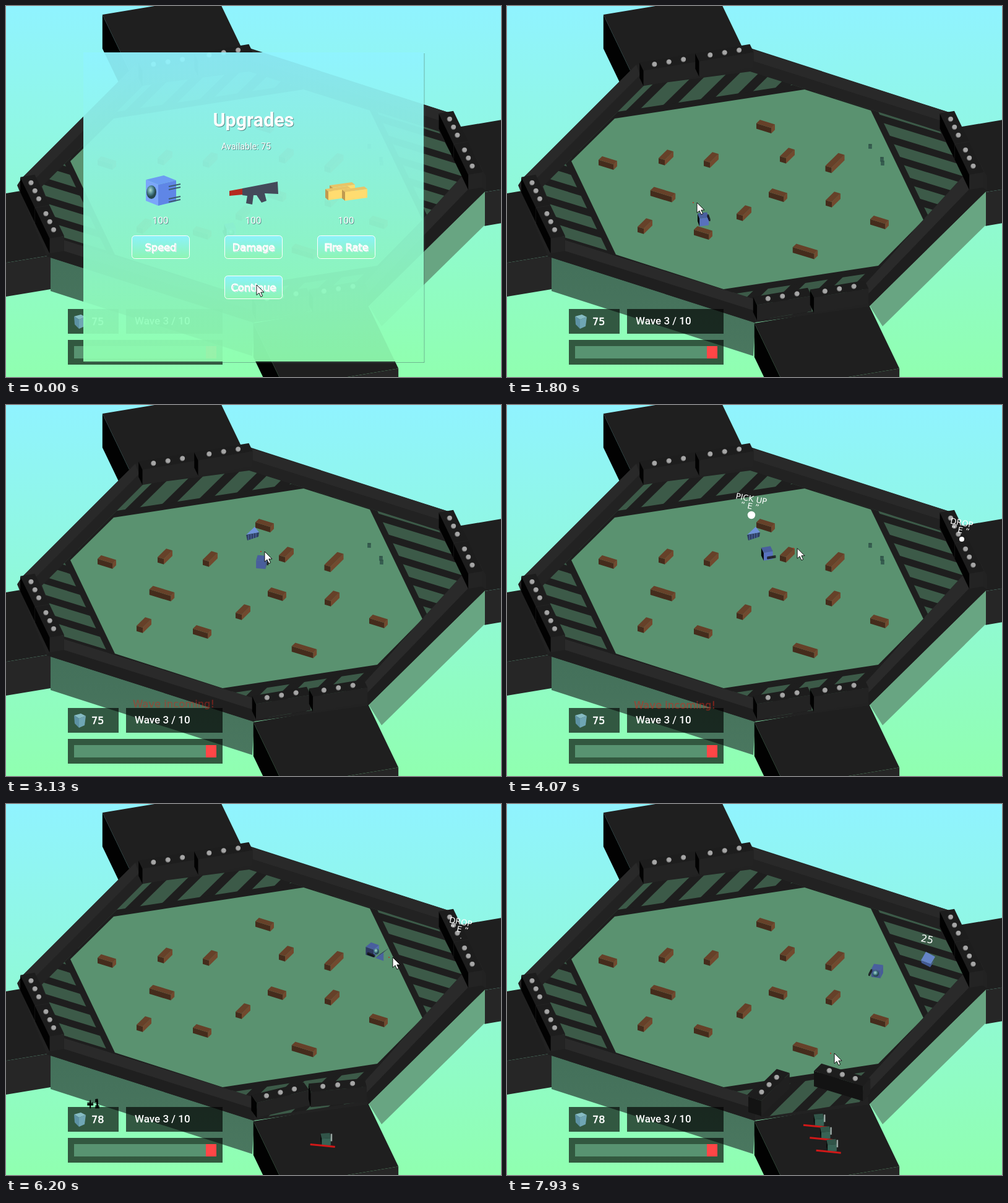
Write an HTML page that moves like this. It is 800 px wide and 600 px high and loops after 8 s.

```html
<!DOCTYPE html>
<html lang="en">
<head>
<meta charset="utf-8">
<title>Arena</title>
<style>
html, body { margin: 0; width: 100%; height: 100%; overflow: hidden; }
svg { display: block; width: 100vw; height: 100vh; }
.wide { font-family: "DejaVu Sans", sans-serif; }
.slim { font-family: Roboto, sans-serif; }
</style>
</head>
<body>
<svg viewBox="0 0 800 600" preserveAspectRatio="none">
  <defs>
    <linearGradient id="sky" x2="0" y2="1"><stop stop-color="#90f3ff"/><stop offset="1" stop-color="#90ffb0"/></linearGradient>
    <linearGradient id="btn" x2="0" y2="1"><stop stop-color="#8cf2fb"/><stop offset="1" stop-color="#8ef5b2"/></linearGradient>
    <linearGradient id="skirt" x2="0" y2="1"><stop stop-color="#43705a"/><stop offset="1" stop-color="#4a775f"/></linearGradient>
    <radialGradient id="glow"><stop stop-color="#d8ffe4"/><stop offset=".2" stop-color="#9be5b4" stop-opacity=".8"/><stop offset="1" stop-color="#78c090" stop-opacity="0"/></radialGradient>
    <radialGradient id="lens" cx=".4" cy=".35"><stop stop-color="#b0dcd0"/><stop offset=".6" stop-color="#4d8590"/><stop offset="1" stop-color="#27494f"/></radialGradient>
    <clipPath id="pit"><path d="M58 292L222 128 393 106 700 203 738 274 580 448 570 482 410 507 400 474 92 378Z"/></clipPath>
  </defs>
  <rect width="800" height="600" fill="url(#sky)"/>
  <g id="arena"></g>
  <g id="actors"></g>
  <g id="hud"></g>
  <g id="menu"></g>
  <g id="pointer"></g>
</svg>
<script>
const $ = id => document.getElementById(id);
const poly = (pts, fill, extra = '') => `<path d="M${pts}Z" fill="${fill}" ${extra}/>`;
const rect = (x, y, w, h, fill, extra = '') =>
  `<rect x="${x}" y="${y}" width="${w}" height="${h}" fill="${fill}" ${extra}/>`;
const dot = (x, y, r, fill) => `<circle cx="${x}" cy="${y}" r="${r}" fill="${fill}"/>`;
const text = (s, x, y, size, cls, extra = '') =>
  `<text x="${x}" y="${y}" font-size="${size}" class="${cls}" fill="#fff" ${extra}>${s}</text>`;
const times = (n, make) => Array.from({ length: n }, (_, i) => make(i)).join('');
const mid = 'text-anchor="middle"';
const clamp = v => Math.min(1, Math.max(0, v));
const lerp = (a, b, k) => a.map((v, i) => v + (b[i] - v) * k);
const shade = (rgb, k) => `rgb(${rgb.map(c => Math.round(c * k))})`;

const WOOD = [150, 96, 60], BLUE = [108, 140, 232], TEAL = [72, 125, 108],
  STEEL = [42, 46, 54], IRON = [42, 42, 42], DECK = [46, 46, 46];
const TURN = Math.PI / 4;

// Ground axes and height to screen offset
const proj = (x, y, z = 0) => [.9 * x + .24 * y, -.15 * x + .5 * y - .77 * z];
const heading = (dx, dy) => Math.atan2(.15 * dx + .9 * dy, .5 * dx - .24 * dy);

// A frame of reference at a screen point, turned by a ground angle
function local(cx, cy, ang) {
  const c = Math.cos(ang), s = Math.sin(ang);
  return (f, r, z) => {
    const p = proj(f * c - r * s, f * s + r * c, z);
    return [cx + p[0], cy + p[1]];
  };
}

// Shaded box around its middle point
function box(cx, cy, len, wid, hgt, ang, rgb) {
  const at = local(cx, cy, ang), h = hgt / 2;
  const corner = [[1, -1], [1, 1], [-1, 1], [-1, -1]].map(([i, j]) => [i * len / 2, j * wid / 2]);
  const sides = times(4, i => {
    const a = corner[i], b = corner[(i + 1) % 4], n = ang + i * Math.PI / 2;
    const nx = Math.cos(n), ny = Math.sin(n);
    if (.5 * ny - .15 * nx < .001) return '';
    const light = .05 + .85 * Math.max(0, .25 * nx + .85 * ny + .06);
    return poly([at(...a, h), at(...b, h), at(...b, -h), at(...a, -h)].join(' '), shade(rgb, light));
  });
  return sides + poly(corner.map(p => at(...p, h)).join(' '), shade(rgb, .68));
}

// Half of a gate; (x, y) is the middle of its upper face
function gate(x, y, ang) {
  const at = local(x, y, ang);
  return box(x, y + 12.5, 98, 26, 32, ang, IRON) + times(3, i => {
    const [px, py] = at(26 * (i - 1), 0, 0);
    return dot(px, py, 4.2, '#6c6c6c') + dot(px + .5, py - .5, 3.6, '#a6a6a6');
  });
}
const gatePair = (x, y, ang) => [-50, 50].map(f => gate(...local(x, y, ang)(f, 0, 0), ang)).join('');

// Hazard bars from (x, y) on, repeated by (dx, dy), running along a ground angle
function bars(n, x, y, dx, dy, ang) {
  return times(n, i => {
    const at = local(x + i * dx, y + i * dy, ang), a = at(-150, 0, 0), b = at(150, 0, 0);
    const next = ([px, py]) => [px + .6 * dx, py + .6 * dy];
    return poly([a, b, next(b), next(a)].join(' '), '#3c5a48');
  });
}

// Wall top from an outer edge a-b to an inner edge c-d, in two tones
function wall(a, b, c, d, outer, inner) {
  const p = lerp(a, c, .5), q = lerp(b, d, .5);
  return poly([a, b, q, p].join(' '), outer) + poly([p, q, d, c].join(' '), inner);
}

function drawArena() {
  const ramp = (x, y) => box(x, y + 27, 205, 208, 71, 0, DECK);
  const floor = '174 182 481 135 588 169 673 346 600 420 350 458 176 402 104 251';
  $('arena').innerHTML =
    ramp(273, 51) + ramp(841, 234) + ramp(-45, 367) +
    poly('72 400 402 504 398 566 72 461', 'url(#skirt)') +
    poly('774 290 774 354 607 518 583 480', '#68a582') +
    ramp(517, 550) +
    poly('18 290 25 279 209 95 390 67 724 175 776 276 776 298 585 486 400 512 66 405', '#222') +
    wall([25, 279], [209, 95], [58, 292], [222, 128], '#292929', '#222') +
    wall([392, 69], [724, 175], [393, 106], [700, 203], '#292929', '#222') +
    wall([66, 405], [400, 512], [92, 378], [402, 474], '#1f1f1f', '#2a2a2a') +
    wall([776, 298], [585, 486], [738, 274], [580, 448], '#1e1e1e', '#2a2a2a') +
    '<g clip-path="url(#pit)">' + rect(0, 80, 800, 440, '#1e1e1e') +
    bars(7, 166, 165, 51, 0, -TURN) + bars(6, 368, 460, 51, 0, -TURN) +
    bars(8, 650, 173, 0, 29, TURN) + bars(7, 100, 243, 0, 29, TURN) +
    poly(floor, '#5a9270', 'stroke="#1e1e1e" stroke-width="20"') + poly(floor, '#5a9270') + '</g>' +
    gatePair(306.5, 83, 0) + gatePair(58.5, 324, 2 * TURN) + gatePair(735, 221, 2 * TURN);
}

function drawMenu() {
  const shadowed = (s, x, y, size, cls, extra) =>
    text(s, x + 1, y + 1, size, cls, `${mid} ${extra} style="fill:#5a8d8a"`) +
    text(s, x, y, size, cls, `${mid} ${extra}`);
  const button = (s, x, y) =>
    rect(x - 46.5, y - 18.5, 93, 37, 'url(#btn)', 'rx="5" stroke="#fff"') +
    shadowed(s, x, y + 6, 16.3, 'wide', 'stroke="#fff" stroke-width=".8"');
  const block = (x, y, l, w, h, colors) => {
    const a = [x, y], b = [x + l[0], y + l[1]], c = [b[0] + w[0], b[1] + w[1]], d = [x + w[0], y + w[1]];
    const low = ([px, py]) => [px, py + h];
    return [[a, b, c, d], [a, d, low(d), low(a)], [d, c, low(c), low(d)]]
      .map((face, i) => poly(face.join(' '), colors[i])).join('');
  };
  const brick = (x, y) => block(x, y, [36, -5], [5, 4], 14, ['#e8c468', '#c09a50', '#ffdc70']);
  const pins = [292, 297, 312, 317].map(y => `M263 ${y}l19-4`).join('');
  $('menu').innerHTML =
    rect(125, 75, 550, 500, 'url(#sky)', 'opacity=".93"') +
    '<path d="M676 77V576.5H127" fill="none" stroke="#4a7068" stroke-dasharray="1 1"/>' +
    shadowed('Upgrades', 400, 195, 30.5, 'slim', 'font-weight="700"') +
    shadowed('Available: 75', 388, 232, 14.2, 'slim', '') +
    block(226, 281, [29, -7], [20, 8], 34, ['#6c9cf2', '#7ba6fa', '#5f86e6']) +
    '<ellipse cx="235" cy="301" rx="8" ry="11" fill="url(#lens)"/>' +
    `<path d="${pins}" stroke="#3d5a70" stroke-width="2"/>` +
    poly('361 299 383 295 383 305 361 307', '#b52a20') +
    poly('382 295 439 284 440 304 418 303 421 315 413 318 405 306 400 306 398 321 388 319 390 307 382 306', '#444a5a') +
    brick(523, 290) + brick(516, 296) + brick(543, 297) +
    [250, 400, 550].map((x, i) => shadowed('100', x - .5, 352, 15.5, 'slim', '') +
      button(['Speed', 'Damage', 'Fire Rate'][i], x, 390)).join('') +
    button('Continue', 400, 455);
}

// Point on a path of [ms, x, y] stops
function along(stops, t, ease = k => k) {
  const i = Math.max(1, stops.findIndex(s => s[0] >= t)), a = stops[i - 1], b = stops[i];
  return lerp(a, b, ease((t - a[0]) / (b[0] - a[0]))).slice(1);
}
const smooth = k => k * k * (3 - 2 * k);

const walk = [[0, 362, 362], [930, 362, 362], [1800, 317, 345], [3130, 413, 254], [5070, 428, 225],
  [6200, 592, 236], [7150, 636, 248], [8000, 595, 272]];
const aim = [[0, 405, 451], [270, 404, 458], [930, 441, 340], [1600, 264, 312], [1800, 307, 318],
  [3130, 418, 237], [5070, 525, 226], [6200, 625, 248], [7150, 690, 255], [8000, 526, 406]];

const crate = (len, ang) => ([x, y]) => [y, box(x, y, len, 12.4, 11.5, ang, WOOD)];
const crates = [
  ...[[163, 254], [418, 195], [438, 306], [317, 367], [602, 350]].map(crate(30, TURN)),
  ...[[252, 305], [482, 397]].map(crate(43, TURN)),
  ...[[257, 245], [330, 249], [453, 242], [527, 313], [383, 335], [223, 356]].map(crate(30, -TURN)),
  crate(45, -TURN)([530, 254])
];
const GRAB = 4700, PLACE = 7200, GATE = 5890;
const picked = i => 5980 + 80 * i;

function player(x, y, ang, holding) {
  const at = local(x, y, ang), facing = Math.sin(ang) * .5 - Math.cos(ang) * .15;
  let out = box(x, y, 16.5, 16.5, 16.5, ang, BLUE);
  if (facing > .12) {
    const [lx, ly] = at(8.5, 0, 0);
    out += `<ellipse cx="${lx}" cy="${ly}" rx="${3 + facing * 4}" ry="5" fill="url(#lens)"/>`;
  }
  out += box(...at(5, 11, -2), 15, 2.5, 4, ang, STEEL);
  if (holding) {
    out += poly([at(12, -8, -8), at(12, 8, -8), at(29, 8, 10), at(29, -8, 10)].join(' '), '#2b3855') +
      poly([at(12, 8, -8), at(29, 8, 10), at(29, 8, -8)].join(' '), '#4a639f');
  }
  return out;
}

function foe(x, y) {
  return box(x, y, 16, 16, 15, .15, TEAL) +
    rect(x + 8, y - 9, 2.5, 12, '#9aa8a4') +
    `<path d="M${x - 25} ${y + 8}l40 4" stroke="#d01818" stroke-width="3"/>`;
}

function sign(word, x, y, r) {
  return `<g transform="translate(${x} ${y}) rotate(11)">` +
    [word, '“ E ”'].map((s, i) => text(s, 0, i * 12, 13, 'wide', mid)).join('') + '</g>' +
    dot(x + 1, y + 22, r, '#fff');
}

function drawActors(t, [px, py], [ax, ay]) {
  const open = Math.max(0, t - GATE) / 1000 * 22 * Math.PI / 180;
  let out = gate(...local(400, 477, -open)(50, 0, 0), -open) +
    gate(...local(582, 450, open)(-50, 0, 0), open);

  const items = [...crates, [py, player(px, py, heading(ax - px, ay - py), t > GRAB && t < PLACE)]];
  [[587, 227], [607, 254], [606, 248]].forEach(([x, y], i) => {
    if (t < picked(i)) items.push([y, box(x, y, 6, 6, 6, .3, TEAL)]);
  });
  if (t > 2500 && t <= GRAB) items.push([208,
    poly('388 210 402 197 409 206', '#6f92d8') + poly('388 210 409 206 408 213 390 219', '#2d3d62') +
    `<path d="${times(4, i => `M${392 + 4 * i} ${210 - i}v8`)}" stroke="#5672b0"/>`]);
  if (t >= PLACE) items.push([250,
    poly('669 253 677 239 692 247 685 259', '#6584c6') + poly('669 253 685 259 691 253 684 264 670 257', '#435a94')]);
  out += items.sort((a, b) => a[0] - b[0]).map(i => i[1]).join('');

  // Foes walk up the ramp in a loose line
  for (let i = 0; i < 3; i++) {
    const born = GATE + 860 * i, [dx, dy] = proj(0, -36 * (t - born) / 1000);
    if (t > born) out += foe(519 + 4 * i + dx * .85, 548 + 5 * i + dy);
  }

  if (t > 200 && t < 400) {
    const k = (t - 200) / 1000;
    out += '<ellipse cx="358" cy="381" rx="26" ry="17" fill="url(#glow)"/>' +
      `<path d="M${356 + 115 * k} ${379 + 143 * k}l3 6" stroke="#8a4a28" stroke-width="3"/>`;
  }

  const beat = 1 - (t + 4030) % 860 / 860;
  if (t > 3700 && t < 5500) out += sign('PICK UP', 394, 156, 10.7 * beat);
  if (t > 3700 && t < PLACE) out += sign('DROP', 734, 195, 7 * beat);
  if (t >= PLACE) out += text('25', 0, 0, 16, 'wide', mid + ' transform="translate(678 224) rotate(11)"');
  $('actors').innerHTML = out;
}

function drawHud(t) {
  const veil = (x, y, w) => rect(x, y, w, 40, 'rgba(0,0,0,.65)');
  // Floating note: rises and fades over one span of k
  const note = (s, x, y, rise, k, size, color) => k < 0 || k >= 1 ? '' :
    text(s, x, y - rise * k, size, 'wide', `style="fill:${color}" stroke="${color}" stroke-width=".3" opacity="${1 - k * k}"`);
  const got = [0, 1, 2].filter(i => t >= picked(i)).length;
  $('hud').innerHTML = veil(100, 490, 82) + veil(194, 490, 156) + veil(100, 540, 250) +
    rect(110, 550, 213, 20, '#589371') + rect(323, 550, 17, 20, '#ff4646') +
    poly('110 502 121 499 129 503 118 507', '#86bcc4') +
    poly('110 502 118 507 118 522 111 515', '#5d92a4') +
    poly('118 507 129 503 127 518 118 522', '#6fa6b4') +
    text(75 + got, 138, 516, 16, 'wide', 'stroke="#fff" stroke-width=".6"') +
    text('Wave 3 / 10', 208, 515, 17, 'slim', 'font-weight="500"') +
    times(3, i => note('+1', 130, 493, 16, (t - picked(i)) / 950, 15, '#000')) +
    (t < 4400 ? note('Wave incoming!', 205, 512, 32, t < 2400 ? -1 : (t - 2400) % 1000 / 1000, 16.4, '#d0281c') : '');
}

function render(t) {
  const tip = along(aim, t, smooth);
  drawActors(t, along(walk, t), tip);
  drawHud(t);
  $('menu').setAttribute('opacity', 1 - clamp((t - 70) / 130));
  $('pointer').innerHTML = (t > 270 ? dot(tip[0] - 6, tip[1], 1, '#c03020') : '') +
    `<path transform="translate(${tip})" d="M0 0V16.5L4 13 6.8 19.3 9.6 18 6.8 12H12Z" fill="#fff" stroke="#000" stroke-width=".9"/>`;
}

drawArena();
drawMenu();
const begin = performance.now();
function tick() {
  render((performance.now() - begin) % 8000);
  requestAnimationFrame(tick);
}
tick();
</script>
</body>
</html>
```
